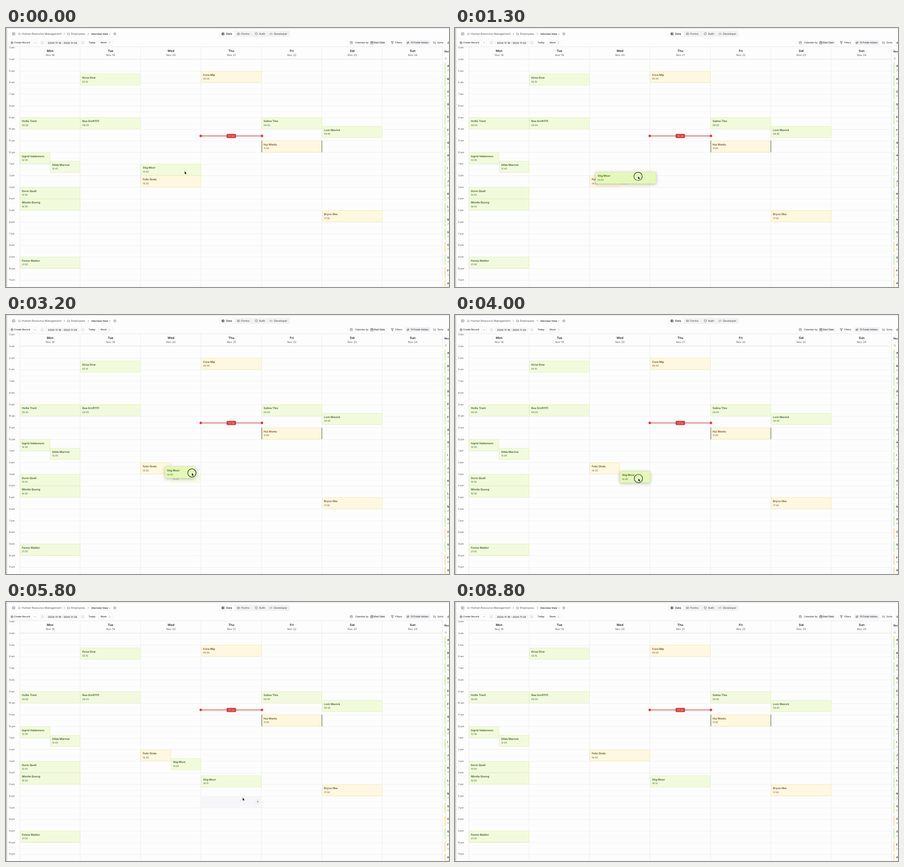
An HTML page with a canvas for the animation above (8.9 s loop, 977 px wide and 573 px high).

```html
<!DOCTYPE html>
<html lang="en">
<head>
<meta charset="utf-8">
<title>Interview calendar</title>
<style>
html, body { margin: 0; width: 100%; height: 100%; overflow: hidden; background: #fdfdfd; }
canvas { display: block; }
</style>
</head>
<body>
<canvas id="stage" width="977" height="573"></canvas>
<script>
const ctx = document.getElementById('stage').getContext('2d');
const LOOP = 8900, COL = 133.27, HOUR = 25.7;
const colX = day => 30.6 + day * COL;
const hourY = hour => 95 + (hour - 5) * HOUR;
const clock = h => `${String(Math.floor(h)).padStart(2, '0')}:${String(Math.round(h % 1 * 60)).padStart(2, '0')}`;

const THEME = {
  green: { fill: '#f1fbdc', edge: '#dcf0b6', ink: '#3e5624', bar: '#c9ea8c' },
  yellow: { fill: '#fdf8df', edge: '#f4e8b0', ink: '#6a481c', bar: '#f1dc7c' },
  hover: { fill: '#e4f8b9', edge: '#d8f0a6', ink: '#3e5624' }
};

// Name, day, start hour, theme, half (0 full, 1 left, 2 right)
const EVENTS = [
  ['Hollis Trent', 0, 9, 'green', 0], ['Ingrid Valdemoro', 0, 12, 'green', 1],
  ['Gilda Marrow', 0, 12.75, 'green', 2], ['Dorin Quell', 0, 15, 'green', 0],
  ['Mirella Quong', 0, 16, 'green', 0], ['Fenna Waldor', 0, 21, 'green', 0],
  ['Kirsa Dow', 1, 5.25, 'green', 0], ['Bea Groft1111', 1, 9, 'green', 0],
  ['Cora Mip', 3, 5, 'yellow', 0], ['Selma Thio', 4, 9, 'green', 0],
  ['Hui Wenlu', 4, 11, 'yellow', 0], ['Lorn Mavick', 5, 9.75, 'green', 0],
  ['Bryce Oke', 5, 17, 'yellow', 0]
];
const MOVED = 'Stig Moor', NEIGHBOUR = 'Felix Onde';

// Pointer tip: time, x, y
const PATH = [
  [0, 394, 317], [600, 394, 317], [900, 391, 310.3], [1300, 403.8, 328.3], [1450, 405, 331],
  [1650, 405, 331], [2100, 357.5, 340.5], [2600, 356.5, 340.5], [3200, 410, 349.5],
  [3500, 410, 350], [3900, 404.5, 361.7], [4000, 404.5, 361.7], [4600, 479.8, 381],
  [4900, 484, 387], [5100, 484, 387], [5700, 522, 433]
];
const DRAGS = [
  { start: 950, end: 1600, from: 13, to: 14, grab: [390.8, 310.3], half: 0 },
  { start: 2600, end: 3500, from: 14, to: 14.75, grab: [356.5, 340.5], half: 1 },
  { start: 4000, end: 5100, from: 14.75, to: 16.25, grab: [404.5, 361.7], half: 2, copy: true }
];
const HIDE = 6200;

function text(s, x, y, size = 6, weight = 400, color = '#555', align = 'left') {
  ctx.font = `${weight} ${size}px Inter, sans-serif`;
  ctx.fillStyle = color;
  ctx.textAlign = align;
  ctx.fillText(s, x, y);
}
function rect(x, y, w, h, fill, edge, radius = 0) {
  ctx.beginPath();
  ctx.roundRect(x, y, w, h, radius);
  if (fill) { ctx.fillStyle = fill; ctx.fill(); }
  if (edge) { ctx.strokeStyle = edge; ctx.lineWidth = .8; ctx.stroke(); }
}
function icon(x, y, d, color = '#666', width = .7) {
  ctx.save();
  ctx.translate(x, y);
  ctx.strokeStyle = color;
  ctx.lineWidth = width;
  ctx.stroke(new Path2D(d));
  ctx.restore();
}
function dot(x, y, r, fill) {
  ctx.beginPath();
  ctx.arc(x, y, r, 0, 7);
  ctx.fillStyle = fill;
  ctx.fill();
}

function slot(day, hour, half) {
  const w = half ? COL / 2 : COL;
  return [colX(day) + (half === 2 ? w : 0), hourY(hour), w];
}
function card(name, hour, [x, y, w], theme) {
  const { fill, edge, ink } = THEME[theme];
  rect(x + .4, y + .4, w - .8, HOUR - .8, fill, edge, 1);
  text(name, x + 4.4, y + 8.9, 6, 600, ink);
  text(clock(hour), x + 4.4, y + 17.7, 5.14, 400, ink);
}

const ICON = {
  right: 'M-1 -1.8L1 0L-1 1.8', left: 'M1 -1.8L-1 0L1 1.8', down: 'M-1.7 -.8L0 .9L1.7 -.8',
  calendar: 'M-2.4 -2H2.4V2.5H-2.4ZM-2.4 -.5H2.4M-1.2 -2.8V-1.4M1.2 -2.8V-1.4',
  panel: 'M-2.7 -2.4H2.7V2.4H-2.7ZM-1 -2.4V2.4M.3 0H1.8',
  cloud: 'M-1.6 1.6A1.5 1.5 0 0 1 -1.6 -1.1A1.9 1.9 0 0 1 1.7 -.7A1.2 1.2 0 0 1 1.7 1.6Z',
  folder: 'M-2.3 -1.8H-.4L.3 -1H2.3V2H-2.3Z',
  table: 'M-2.5 -2.4H2.5V2.4H-2.5ZM-2.5 -.8H2.5M-2.5 .8H2.5M-.7 -2.4V2.4',
  form: 'M-2.8 -1.5H2.8V1.5H-2.8ZM-.9 -2.5V2.5',
  shield: 'M0 -2.8L2.4 -1.8V.2C2.4 1.6 1 2.4 0 2.8C-1 2.4 -2.4 1.6 -2.4 .2V-1.8ZM-.9 0L-.2 .8L1 -.7',
  code: 'M-1.6 -1.7L-3.2 0L-1.6 1.7M1.6 -1.7L3.2 0L1.6 1.7M.6 -2.3L-.6 2.3',
  plus: 'M-1.5 0H1.5M0 -1.5V1.5', circle: 'M2.6 0A2.6 2.6 0 1 1 2.6 -.01Z',
  funnel: 'M-2.6 -2.4H2.6L.7 .2V2.5L-.7 1.8V.2Z',
  eye: 'M-2.7 0Q0 -3.4 2.7 0Q0 3.4 -2.7 0M-2 2.2L2 -2.2',
  sort: 'M-1.4 2.4V-2.4L-2.6 -1M1.4 -2.4V2.4L2.6 1',
  updown: 'M-1.2 -.8L0 -2L1.2 -.8M-1.2 .8L0 2L1.2 .8',
  search: 'M1.2 -.3A1.6 1.6 0 1 1 1.2 -.31M.7 1L2 2.3'
};

function drawTopBar() {
  icon(17, 13, ICON.panel);
  icon(29.5, 13, ICON.cloud);
  text('Human Resource Management', 35, 13);
  icon(128.5, 13, ICON.right);
  icon(138, 13, ICON.folder);
  text('Employees', 143.5, 13);
  icon(181.5, 13, ICON.right);
  text('Interview View', 188.3, 13.3, 5.14, 600, '#222');
  icon(229, 13.3, ICON.down);
  icon(240, 13, ICON.circle);
  dot(240, 13, 1, '#666');

  rect(470, 6.5, 156, 13, '#f1f2f4', null, 3);
  rect(471.5, 7.5, 32.5, 11, '#fff', null, 2.5);
  icon(478.5, 13, ICON.table, '#222');
  text('Data', 485.5, 13, 6, 500, '#222');
  [['Forms', 'form', 513, 519], ['Auth', 'shield', 552, 558], ['Developer', 'code', 584.5, 591]]
    .forEach(([label, name, ix, x]) => { icon(ix, 13, ICON[name]); text(label, x, 13, 6, 500); });
}

function drawToolbar() {
  const y = 32.5, label = (s, x, color = '#333') => text(s, x, y, 5.14, 500, color);
  rect(6.5, 27, 63, 11, '#fff', '#eeeef0', 2);
  icon(13.3, y, ICON.circle, '#333');
  icon(13.3, y, ICON.plus, '#333');
  label('Create Record', 18, '#222');
  icon(64.2, y, ICON.down);
  ctx.fillStyle = '#eee';
  ctx.fillRect(58.5, 27.5, .7, 10);
  rect(75, 27.5, 10.5, 10, '#f5f5f6', null, 2);
  icon(80.3, y, ICON.left, '#999');
  rect(87, 27.5, 75, 10, '#f6f6f7', null, 2);
  text('2024-11-18 - 2024-11-24', 124.7, y + .4, 5.45, 500, '#333', 'center');
  rect(164, 27.5, 10.5, 10, '#f5f5f6', null, 2);
  icon(169.3, y, ICON.right, '#999');
  label('Today', 182.3, '#222');
  rect(203.5, 27, 31.5, 11, '#fff', '#eeeef0', 2);
  label('Week', 208.3);
  icon(228.5, y, ICON.updown);

  icon(761.5, y, ICON.calendar);
  label('Calendar by', 770);
  rect(802.5, 27.5, 37, 10, '#f6f6f7', null, 2);
  icon(807, y, ICON.calendar, '#333');
  label('Start Date', 811, '#222');
  icon(852, y, ICON.funnel, '#333');
  label('Filters', 858.5);
  rect(881, 27, 55, 11, '#eff1f4', null, 2);
  icon(886.5, y, ICON.eye, '#333');
  label('15 Fields hidden', 892.5);
  icon(945, y, ICON.sort, '#333');
  label('Sorts', 951.5);
  icon(976, y, ICON.eye, '#333');
}

function drawGrid() {
  for (let h = 4; h < 24; h += .5) {
    ctx.fillStyle = h % 1 ? '#f8f8f9' : '#f0f0f1';
    ctx.fillRect(30, Math.round(hourY(h)), 933, 1);
  }
  ctx.fillStyle = '#e9e9eb';
  ctx.fillRect(3, 41, 961, 1);
  ctx.fillRect(30, 68, 933, 1);
  for (let d = 0; d <= 7; d++) {
    ctx.fillStyle = d === 7 ? '#e6e6e8' : '#eeeeef';
    ctx.fillRect(Math.round(colX(d)) - 1, 42, 1, 531);
  }
  ['Mon', 'Tue', 'Wed', 'Thu', 'Fri', 'Sat', 'Sun'].forEach((name, d) => {
    const x = colX(d) + COL / 2;
    text(name, x, 50.6, 6.85, 600, '#222', 'center');
    text(`Nov ${18 + d}`, x, 60, 6, 400, '#555', 'center');
  });
  for (let h = 3; h < 24; h++)
    text(`${h % 12 || 12} ${h < 12 ? 'am' : 'pm'}`, 13, hourY(h) + .2, 5.14, 400, '#444', 'center');
}

function drawSidebar() {
  text('Records', 967, 52, 6, 600, '#222');
  icon(970, 67.5, ICON.search, '#888');
  [...'ABCDEFGHIJKLMSCSFH'].forEach((letter, i) => {
    const y = 84.6 + i * 28.26;
    rect(967.8, y - 8.3, 20, 24.5, '#fff', '#eeeeef', 2);
    rect(967.5, y - 8.3, 1.8, 24.5, THEME[[14, 16, 17].includes(i) ? 'yellow' : 'green'].bar, null, 1);
    text(letter, 973, y, 6, 600, '#222');
    text('2024', 973, y + 9.3, 5.14, 400, '#777');
  });
}

function drawNow() {
  const y = 238.8, red = '#d93a3c';
  ctx.fillStyle = red;
  ctx.fillRect(429.5, y - .7, 135, 1.4);
  dot(429.5, y, 2.7, red);
  dot(564.5, y, 2.7, red);
  rect(486.5, 234.2, 20.8, 9.4, red, null, 2);
  text('10:34', 497, y + .2, 5.14, 400, '#fbdada', 'center');
}

function pointerAt(t) {
  const next = PATH.findIndex(p => p[0] > t);
  if (next < 0) return PATH[PATH.length - 1].slice(1);
  const [t0, x0, y0] = PATH[next - 1], [t1, x1, y1] = PATH[next];
  const k = (t - t0) / (t1 - t0), e = k * k * (3 - 2 * k);
  return [x0 + (x1 - x0) * e, y0 + (y1 - y0) * e];
}

function drawPointer(x, y, hand, pressed) {
  if (pressed) {
    ctx.beginPath();
    ctx.arc(x, y, 9.2, 0, 7);
    ctx.strokeStyle = '#26301c';
    ctx.lineWidth = 1.2;
    ctx.stroke();
  }
  const shape = new Path2D(hand
    ? 'M-.7 0Q0 -.8 .6 0V2L2.6 2.5Q3.2 2.7 3 4L2.4 6.3H-.6L-2 3.8Q-1.6 2.9 -.7 3.8Z'
    : 'M0 0V6L1.4 4.8L2.3 6.9L3.4 6.4L2.5 4.4H4.2Z');
  ctx.save();
  ctx.translate(x, y);
  ctx.lineJoin = 'round';
  ctx.strokeStyle = hand ? '#333' : '#fff';
  ctx.lineWidth = hand ? .9 : 1;
  ctx.stroke(shape);
  ctx.fillStyle = hand ? '#fff' : '#111';
  ctx.fill(shape);
  ctx.restore();
}

function drawMoving(t) {
  const [px, py] = pointerAt(t);
  const drag = DRAGS.find(d => t >= d.start && t < d.end);
  const over = ([x, y, w]) => px > x && px < x + w && py > y && py < y + HOUR;
  const cards = [];
  let ghost = null, wed = null, neighbourHalf = 0;

  if (t < DRAGS[0].start) wed = [13, 0];
  else if (t >= DRAGS[0].end && t < DRAGS[1].start) wed = [14, 1];
  else if (t >= DRAGS[1].end && t < HIDE) wed = [14.75, 2];
  if (wed) {
    cards.push([wed[0], slot(2, ...wed)]);
    neighbourHalf = wed[1] && 3 - wed[1];
  }
  if (t >= DRAGS[2].end) cards.push([16.25, slot(3, 16.25, 0)]);

  if (drag && !drag.copy) {
    const k = Math.min(1, (t - drag.start) / 300);
    const hour = Math.round((drag.from + (drag.to - drag.from) * k) * 4) / 4;
    const half = hour <= 13 ? 0 : hour < 14 ? 1 : 2;
    ghost = [hour, slot(2, hour, half)];
    neighbourHalf = half && 3 - half;
  } else if (drag && px > colX(3)) {
    const hour = t < 4800 ? 16 : drag.to;
    ghost = [hour, slot(3, hour, 0)];
  }

  if (t > DRAGS[2].end && t < HIDE && py > hourY(17.25)) {
    const y = hourY(Math.floor(5 + (py - 95) / HOUR));
    rect(colX(3), y, COL, HOUR, '#f6f6fa');
    rect(549.8, y + 7.3, 10.5, 10.5, '#f0f0f4', null, 2);
    icon(555, y + 12.6, ICON.plus, '#555');
  }
  card(NEIGHBOUR, 14, slot(2, 14, neighbourHalf), 'yellow');

  let hand = false;
  for (const [hour, box] of cards) {
    const hovered = !drag && t > 600 && t < HIDE && over(box);
    hand = hand || hovered;
    card(MOVED, hour, box, hovered ? 'hover' : 'green');
  }
  if (ghost) {
    ctx.globalAlpha = .5;
    card(MOVED, ...ghost, 'green');
    ctx.globalAlpha = 1;
  }
  drawNow();
  if (drag) {
    const [x, y, w] = slot(2, drag.from, drag.half);
    const box = [x + px - drag.grab[0], y + py - drag.grab[1], w];
    ctx.save();
    ctx.shadowColor = 'rgba(0,0,0,.28)';
    ctx.shadowBlur = 7;
    ctx.shadowOffsetY = 1.5;
    rect(...box, HOUR, THEME.hover.fill, null, 1.5);
    ctx.restore();
    card(MOVED, drag.from, box, 'hover');
  }
  if (t < HIDE) drawPointer(px, py, hand, !!drag);
}

function draw(now) {
  ctx.textBaseline = 'middle';
  ctx.textRendering = 'geometricPrecision';
  rect(0, 0, 977, 573, '#fdfdfd');
  rect(0, 0, 977, 2, '#ececee');
  rect(0, 0, 2.5, 573, '#cfcfd2');
  drawGrid();
  drawTopBar();
  drawToolbar();
  drawSidebar();
  for (const [name, day, hour, theme, half] of EVENTS) card(name, hour, slot(day, hour, half), theme);
  ctx.fillStyle = '#46525a';
  ctx.fillRect(563.7, hourY(11), 1, HOUR);
  ctx.fillRect(696.2, hourY(11), 1, HOUR);
  drawMoving(now % LOOP);
  requestAnimationFrame(loop);
}
const loop = () => draw(performance.now());
loop();
</script>
</body>
</html>
```
